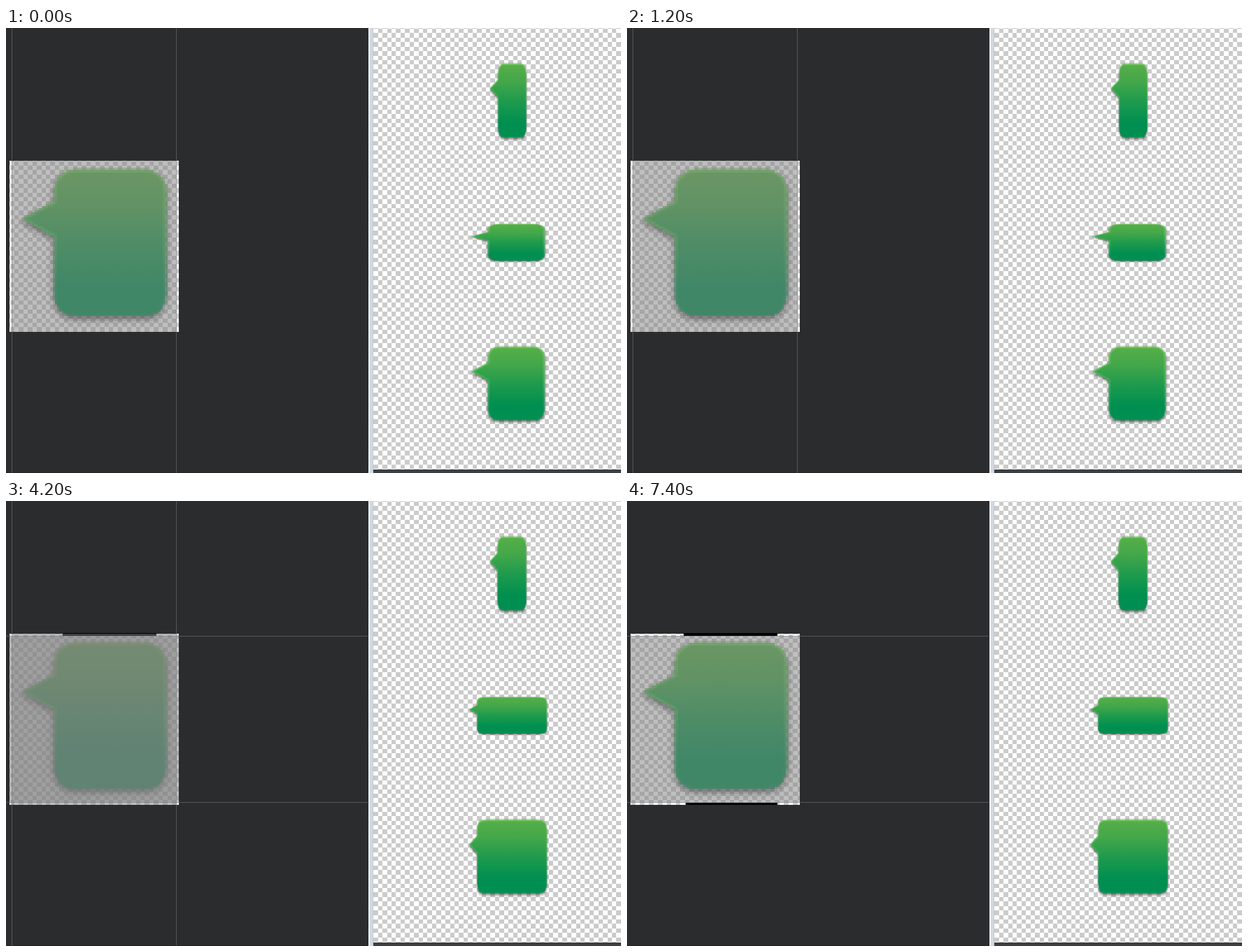
An HTML page with a canvas that plays this animation: 879 px wide and 637 px high, repeating every 8000 ms.

```html
<!DOCTYPE html>
<html lang="en">
<head>
<meta charset="utf-8">
<title>Nine-patch editor</title>
<style>
html, body { margin: 0; width: 100%; height: 100%; overflow: hidden; background: #2b2c2e; }
canvas { display: block; }
</style>
</head>
<body>
<canvas id="stage" width="879" height="637"></canvas>
<script>
const W = 879, H = 637, LOOP = 8000;
const ctx = document.getElementById('stage').getContext('2d');

// The edited image has 75 x 76 pixels including its one-pixel border.
const CELL = 6.43;
const PIXEL = CELL / 2;
const TILE = { x: 5, y: 190, w: 242, h: 245 };
const ORIGIN = { x: 5.6, y: 190.5 };
const INNER = { x: ORIGIN.x + PIXEL, y: ORIGIN.y + PIXEL, w: PIXEL * 73, h: PIXEL * 74 };
const VEIL = 'rgba(128,128,128,0.5)';

function layer(w, h, paint) {
  const c = document.createElement('canvas');
  c.width = w;
  c.height = h;
  paint(c.getContext('2d'));
  return c;
}

// Fills a box with a checkerboard whose first white cell starts at (ox, oy).
function checker(g, { x, y, w, h }, ox, oy) {
  g.save();
  g.beginPath();
  g.rect(x, y, w, h);
  g.clip();
  g.fillStyle = '#fff';
  g.fillRect(x, y, w, h);
  g.fillStyle = '#cbcbcb';
  const edge = (o, i) => Math.round(o + i * CELL);
  for (let r = -1; edge(oy, r) < y + h; r++) {
    for (let c = -1; edge(ox, c) < x + w; c++) {
      if ((r + c) % 2 === 0) continue;
      const left = edge(ox, c), top = edge(oy, r);
      g.fillRect(left, top, edge(ox, c + 1) - left, edge(oy, r + 1) - top);
    }
  }
  g.restore();
}

function bubblePath(g) {
  const l = 68.5, t = 202.5, r = 229, b = 412.5, rad = 29;
  g.beginPath();
  g.moveTo(l + rad, t);
  g.arcTo(r, t, r, b, rad);
  g.arcTo(r, b, l, b, rad);
  g.arcTo(l, b, l, t, rad);
  g.lineTo(l, 299);
  g.lineTo(22, 273.5);
  g.lineTo(l, 248);
  g.arcTo(l, t, r, t, rad);
  g.closePath();
}

function ramp(g, y0, y1, stops) {
  const grad = g.createLinearGradient(0, y0, 0, y1);
  stops.forEach(([at, color]) => grad.addColorStop(at, color));
  return grad;
}

// Painted at its true pixel size so that enlarging shows the pixels.
const bubble = layer(73, 74, g => {
  g.setTransform(1 / PIXEL, 0, 0, 1 / PIXEL, -INNER.x / PIXEL, -INNER.y / PIXEL);
  bubblePath(g);
  g.save();
  g.shadowColor = 'rgba(0,0,0,0.65)';
  g.shadowBlur = 3;
  g.shadowOffsetY = 1.3;
  g.fillStyle = ramp(g, 202, 412, [
    [0, '#57ae48'], [0.25, '#43a74a'], [0.5, '#209b4d'], [0.8, '#008f50'], [1, '#008f50']
  ]);
  g.fill();
  g.restore();
  g.clip();
  g.lineWidth = 7;
  g.strokeStyle = ramp(g, 202, 412, [
    [0, 'rgba(125,215,100,0.65)'], [0.5, 'rgba(90,200,90,0.5)'], [1, 'rgba(30,160,90,0.15)']
  ]);
  g.stroke();
});

const backdrop = layer(W, H, g => {
  g.fillStyle = '#2b2c2e';
  g.fillRect(0, 0, W, H);
  g.fillStyle = '#242527';
  g.fillRect(0, 636, 517, 1);
  checker(g, { x: 525, y: 0, w: 354, h: 632 }, 525.25, 1);
  g.fillStyle = '#3c3f41';
  g.fillRect(525, 632, 354, 5);

  g.fillStyle = '#f0f3f6';
  g.fillRect(518, 0, 7, H);
  g.fillStyle = '#b3c2cf';
  for (let y = 0; y < H; y++) {
    for (let x = 520 + y % 2; x < 524; x += 2) g.fillRect(x, y, 1, 1);
  }
  g.fillStyle = '#c3c8cc';
  g.fillRect(524, 0, 1, H);

  checker(g, TILE, ORIGIN.x, ORIGIN.y);
  g.imageSmoothingEnabled = false;
  g.drawImage(bubble, INNER.x, INNER.y, INNER.w, INNER.h);
});

// Stretches only the marked columns when a patch is defined.
function preview(x, y, w, h, patched) {
  ctx.imageSmoothingEnabled = true;
  ctx.imageSmoothingQuality = 'high';
  if (!patched) {
    ctx.drawImage(bubble, x, y, w, h);
    return;
  }
  const natural = PIXEL / 4;
  const left = 23, right = 9, mid = 73 - left - right;
  const a = Math.floor(x + left * natural);
  const b = Math.floor(x + w - right * natural);
  ctx.drawImage(bubble, 0, 0, left, 74, x, y, a - x, h);
  ctx.drawImage(bubble, left, 0, mid, 74, a, y, b - a, h);
  ctx.drawImage(bubble, left + mid, 0, right, 74, b, y, x + w - b, h);
}

// Hovered guides: V marks the columns, H the rows.
const GUIDES = [
  [0, 'V'], [300, 'HV'], [400, 'H'], [500, 'HV'], [700, 'H'], [1000, 'HV'],
  [1200, 'V'], [2200, ''], [4100, 'V'], [4200, 'HV'], [5000, 'V'], [5400, ''],
  [7300, 'HV'], [7400, 'H']
];
// Right end of each dragged selection, 0 when there is none.
const TOP_DRAG = [[0, 0], [2400, 87], [2500, 103], [2600, 123], [2700, 139], [3400, 216], [4000, 0]];
const BOTTOM_DRAG = [[0, 0], [5500, 97], [5600, 114], [6200, 216], [7200, 0]];

function valueAt(track, t) {
  let value = track[0][1];
  for (const [start, v] of track) if (t >= start) value = v;
  return value;
}

function bar(x, y, w, h) {
  ctx.fillStyle = '#000';
  ctx.fillRect(x, y, w, h);
}

function outline(x0, y0, x1, y1) {
  if (!x1) return;
  ctx.lineWidth = 1;
  ctx.strokeStyle = '#000';
  ctx.strokeRect(x0 + 0.5, y0 + 0.5, x1 - x0 - 1, y1 - y0 - 1);
}

function drawGuides(guides) {
  ctx.fillStyle = VEIL;
  if (guides.includes('V')) {
    ctx.fillRect(8, TILE.y, 236, TILE.h);
    ctx.fillRect(8, 0, 1, H);
    ctx.fillRect(243, 0, 1, H);
  }
  if (guides.includes('H')) {
    ctx.fillRect(TILE.x, 193, TILE.w, 239);
    ctx.fillRect(0, 193, 517, 1);
    ctx.fillRect(0, 431, 517, 1);
  }
}

function draw(t) {
  ctx.drawImage(backdrop, 0, 0);
  const patched = t >= 4000;
  preview(688.3, 46.8, 59, 119.3, patched);
  preview(659, 278.4, 118, 59.6, patched);
  preview(659, 451.8, 118, 119.3, patched);

  if (patched) bar(81, 189, 134, 4);
  if (t >= 7200) bar(84, 432, 131, 3);

  outline(81, 189, valueAt(TOP_DRAG, t), 194);
  outline(84, 432, valueAt(BOTTOM_DRAG, t), 436);

  drawGuides(valueAt(GUIDES, t));
}

const begin = performance.now();
function tick() {
  draw((performance.now() - begin) % LOOP);
  requestAnimationFrame(tick);
}
tick();
</script>
</body>
</html>
```
